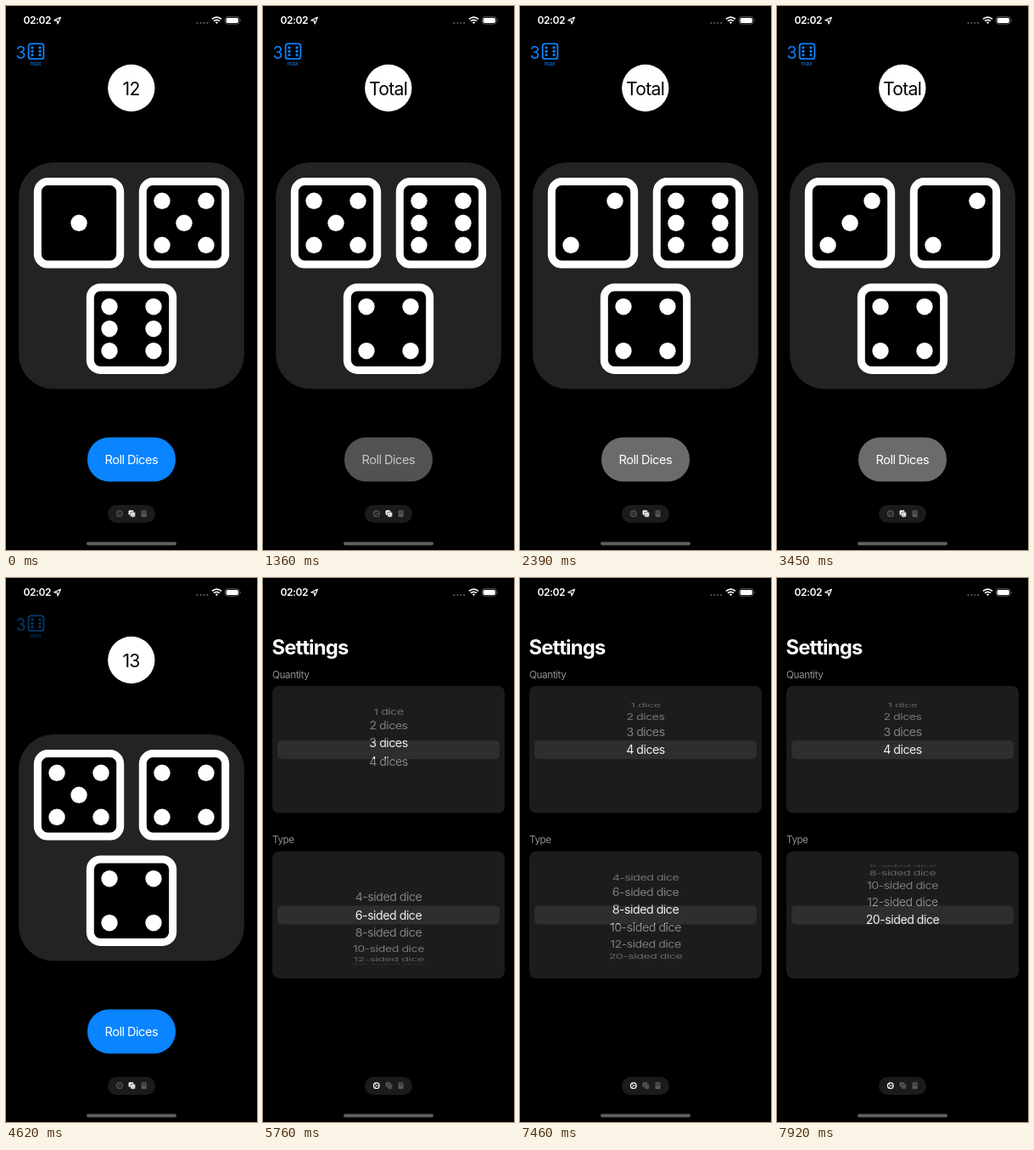
Recreate the animation shown at these times as an HTML page. Size 296x640 px, loop 8000 ms.

```html
<!DOCTYPE html>
<html lang="en">
<head>
<meta charset="utf-8">
<title>Dice roller</title>
<style>
  html, body { margin: 0; height: 100%; background: #000; overflow: hidden; }
  svg { display: block; width: 100vw; height: 100vh; }
  text { font-family: Inter, "Noto Sans", sans-serif; letter-spacing: -.035em; fill: #fff; }
</style>
</head>
<body>
<svg id="stage" viewBox="0 0 296 640">
  <clipPath id="bar0"><rect x="17" y="191" width="262" height="22"/></clipPath>
  <clipPath id="bar1"><rect x="17" y="385.5" width="262" height="22"/></clipPath>
  <g id="scene"></g>
  <g id="status" fill="#fff">
    <text x="20.5" y="21" font-size="12" font-weight="600">02:02</text>
    <path d="M64.3 13.4 56.8 16.8 60.4 17.4 61 21Z" fill="none" stroke="#fff" stroke-width="1.2" stroke-linejoin="round"/>
    <g fill="#5c5c5e">
      <circle cx="225.5" cy="20" r="1.1"/><circle cx="229.5" cy="20" r="1.1"/>
      <circle cx="233.3" cy="20" r="1.1"/><circle cx="237.2" cy="20" r="1.1"/>
    </g>
    <g fill="none" stroke="#fff" stroke-width="1.7">
      <path d="M243 15.4Q248.5 10.8 254 15.4M245 17.7Q248.5 14.9 252 17.7"/>
    </g>
    <path d="M248.5 20.9 246.8 19.2Q248.5 17.9 250.2 19.2Z"/>
    <rect x="258.5" y="12.7" width="16.6" height="8.4" rx="2.6" fill="none" stroke="#77777a" stroke-width=".8"/>
    <rect x="259.7" y="13.9" width="14.2" height="6" rx="1.6"/>
    <path d="M276 15.4Q277.6 16.9 276 18.4Z" fill="#77777a"/>
    <rect x="95" y="630.4" width="106" height="4" rx="2" fill="#606062"/>
  </g>
</svg>
<script>
const LOOP = 8000;
const BLUE = '#0a84ff';
const scene = document.getElementById('scene');

// Start time and the three faces shown from then on
const ROLLS = [
  [0, '156'], [1200, '325'], [1280, '632'], [1360, '564'], [1440, '251'], [1510, '416'],
  [1580, '623'], [1770, '345'], [1880, '162'], [1990, '436'], [2090, '654'], [2260, '314'],
  [2390, '264'], [2520, '434'], [2660, '154'], [2820, '124'], [3120, '164'], [3450, '324'],
  [3790, '254'], [4160, '544']
];
const DICE_AT = [[86, 255.3], [210, 255.3], [148, 379.7]];
const QUANTITY = ['1 dice', '2 dices', '3 dices', '4 dices'];
const TYPES = [4, 6, 8, 10, 12, 20].map(n => n + '-sided dice');

const clamp = (v, lo, hi) => Math.min(hi, Math.max(lo, v));
const smooth = p => p * p * (3 - 2 * p);
// Value held from its start time until the next one
const held = (t, keys) => keys.filter(k => k[0] <= t).pop()[1];

const label = (x, y, size, str, attrs = '') =>
  `<text x="${x}" y="${y}" font-size="${size}" ${attrs}>${str}</text>`;
const box = (x, y, w, h, r, attrs) =>
  `<rect x="${x}" y="${y}" width="${w}" height="${h}" rx="${r}" ${attrs}/>`;
const centered = 'text-anchor="middle"';

function pips(n, cx, cy, dx, dy, r) {
  const spots = [];
  if (n % 2) spots.push([0, 0]);
  if (n > 1) spots.push([1, -1], [-1, 1]);
  if (n > 3) spots.push([-1, -1], [1, 1]);
  if (n > 5) spots.push([-1, 0], [1, 0]);
  return spots.map(([x, y]) => `<circle cx="${cx + x * dx}" cy="${cy + y * dy}" r="${r}"/>`).join('');
}

function die(n, [x, y]) {
  return box(x - 48.7, y - 48.7, 97.4, 97.4, 12, 'fill="#000" stroke="#fff" stroke-width="9"') +
    `<g fill="#fff">${pips(n, x, y, 26, 26, 9.7)}</g>`;
}

function tabs(active) {
  const color = i => i === active ? '#fff' : '#59595b';
  return box(120, 587, 56, 21, 10.5, 'fill="#1b1b1c"') +
    `<g fill="none" stroke="${color(0)}"><circle cx="133.8" cy="597.2" r="3.3" stroke-width="1.2"/>
      <path d="M132 594.4 133.6 597.2H137M133.6 597.2 132 600" stroke-width=".8"/></g>` +
    `<g fill="${color(1)}">${box(144.6, 593.2, 5.8, 5.8, 1.4, '')}
      ${box(146.6, 595.2, 6, 6, 1.4, 'stroke="#1b1b1c" stroke-width=".6"')}
      <g fill="#1b1b1c">${pips(5, 149.6, 598.2, 1.5, 1.5, .5)}</g></g>` +
    `<g fill="${color(2)}">${box(159.6, 593.2, 6, 8, 1.2, '')}
      <path d="M160.6 595H164.6M160.6 597H164.6" stroke="#1b1b1c" stroke-width=".7"/></g>`;
}

function home(t) {
  const rolling = t >= 1120 && t < 4160;
  const total = rolling ? 'Total' : t < 1120 ? '12' : '13';
  const pressed = held(t, [[0, 1], [4480, .55], [4620, .43]]);
  const wake = rolling ? .6 + .4 * clamp((t - 1040) / 540, 0, 1) ** 1.6 : 1;
  const faces = held(t, ROLLS);
  return `<g fill="${BLUE}" opacity="${pressed}">` +
      label(11.5, 62, 19.5, '3', `style="fill:${BLUE}"`) +
      box(26.6, 44.4, 17.8, 17.8, 3, `fill="none" stroke="${BLUE}" stroke-width="1.8"`) +
      pips(6, 35.5, 53.3, 4.5, 4.4, 1.6) +
      label(28.5, 70, 6.6, 'max', `style="fill:${BLUE};letter-spacing:0"`) + '</g>' +
    '<circle cx="147.8" cy="96.5" r="27.7" fill="#fff"/>' +
    label(147.6, 104.5, 21.2, total, centered + ' style="fill:#000"') +
    box(15, 184, 266, 266.5, 41, 'fill="#232325"') +
    DICE_AT.map((at, i) => die(+faces[i], at)).join('') +
    `<g opacity="${wake}">` +
      box(96, 507.5, 104, 52, 25.5, `fill="${rolling ? '#6b6b6b' : BLUE}"`) +
      label(147.8, 538.8, 14.6, 'Roll Dices', centered) + '</g>' +
    tabs(1);
}

// Rows on a turning cylinder; the part inside the bar is brighter
function wheel(id, rows, pos, cy) {
  const draw = bright => rows.map((row, i) => {
    const angle = (i - pos) * 21 * Math.PI / 180;
    if (Math.abs(angle) > 1.5) return '';
    const squash = Math.cos(angle);
    const alpha = bright ? .92 : .46 * Math.sqrt(squash);
    const y = cy + 58.6 * Math.sin(angle);
    return `<g transform="translate(148 ${y.toFixed(2)}) scale(1 ${squash.toFixed(3)})" opacity="${alpha.toFixed(3)}">` +
      label(0, 5.1, 14.2, row, centered) + '</g>';
  }).join('');
  const bar = box(17, cy - 11, 262, 22, 5, 'fill="#2e2e30"');
  return box(11, cy - 75, 274, 149.5, 8, 'fill="#1c1c1e"') +
    draw(false) + bar + `<g clip-path="url(#bar${id})">${draw(true)}</g>`;
}

function settings(t) {
  const quantity = held(t, [
    [0, 2], [5760, 2.36], [5840, 2.76], [5920, 3.05], [6000, 3.14],
    [6380, 3.12], [6465, 3.09], [6550, 3.06], [6635, 3.04], [6720, 3.02], [7150, 3]
  ]);
  const step = clamp(Math.floor((t - 7150) / 77) + 1, 0, 11);
  const type = 1 + 4 * smooth(step / 13);
  const gray = 'style="fill:#8e8e93"';
  return label(10.5, 89.8, 23.8, 'Settings', 'font-weight="700"') +
    label(11, 117.5, 11.7, 'Quantity', gray) +
    wheel(0, QUANTITY, quantity, 202) +
    label(11, 312, 11.7, 'Type', gray) +
    wheel(1, TYPES, type, 396.5) +
    tabs(0);
}

let last = '';
function frame(now) {
  const t = now % LOOP;
  const shown = held(t, [[0, 0], [4700, .35], [4780, .75], [4860, 1]]);
  let html = shown < 1 ? home(t) : '';
  if (shown) html += `<g opacity="${shown}">${box(0, 0, 296, 640, 0, 'fill="#000"')}${settings(t)}</g>`;
  if (html !== last) scene.innerHTML = last = html;
  requestAnimationFrame(frame);
}
frame(performance.now());
</script>
</body>
</html>
```
